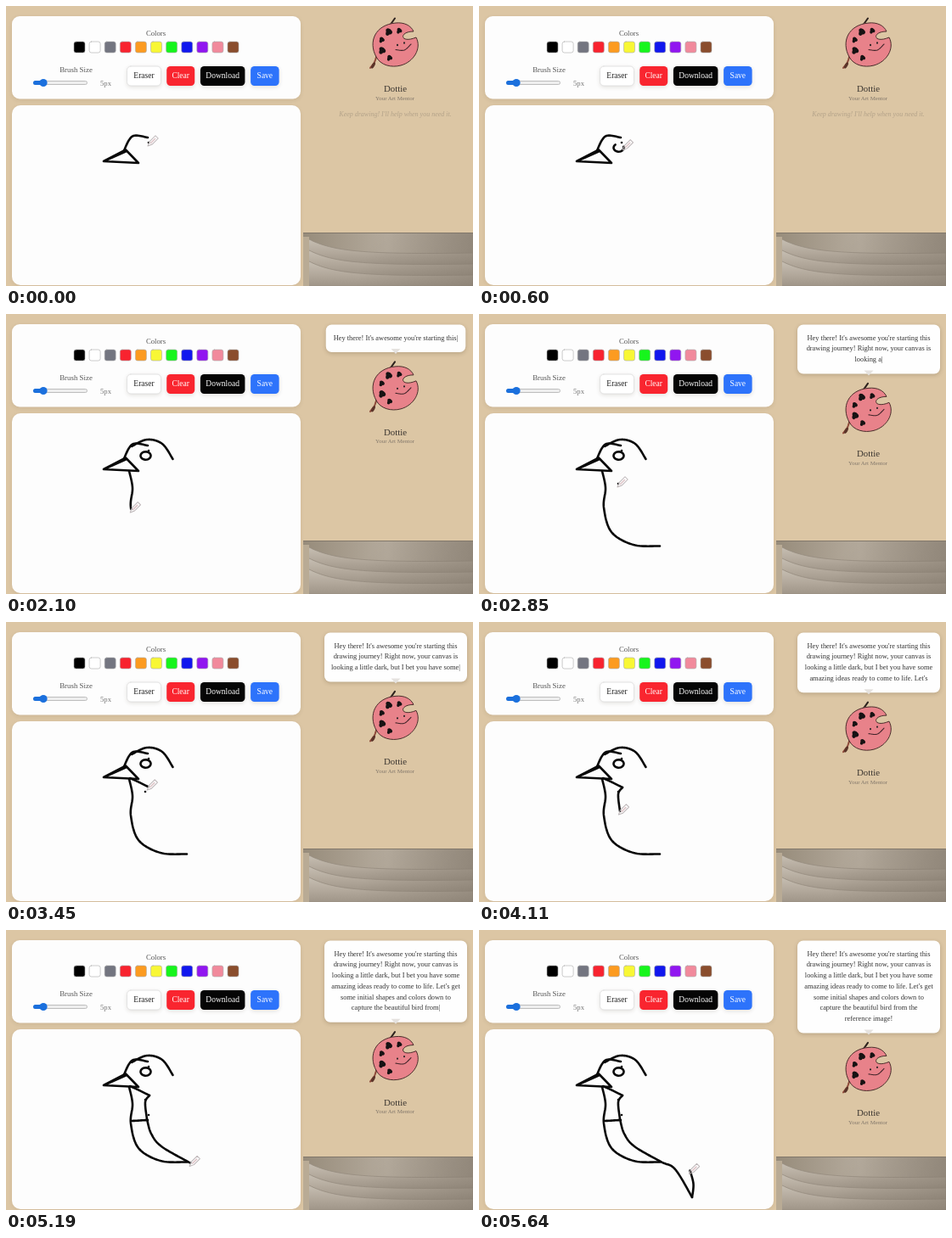
An HTML page with a canvas for the animation above (5670 ms loop, 550 px wide and 330 px high).

```html
<!DOCTYPE html>
<html lang="en">
<head>
<meta charset="utf-8">
<title>Drawing board</title>
<style>
html, body { margin: 0; width: 100%; height: 100%; overflow: hidden; background: #dcc6a4; }
#stage { position: absolute; left: 0; top: 0; width: 550px; height: 330px; overflow: hidden;
  font-family: "Liberation Serif", "Times New Roman", serif; }
canvas { position: absolute; left: 0; top: 0; width: 550px; height: 330px; }
.label { position: absolute; transform: translate(-50%, -50%); white-space: pre; line-height: 1; }
#speech { position: absolute; left: 359px; width: 200px; top: 22.6px; text-align: center;
  white-space: pre; font-size: 8.4px; line-height: 12.75px; color: #333; }
</style>
</head>
<body>
<div id="stage">
  <canvas id="board"></canvas>
  <div id="speech"></div>
</div>
<script>
const LOOP = 5670, STEP = 30;
const LINE_H = 12.75, BUBBLE_TOP = 12.5;
const SPEECH_START = 1500, WORD_MS = 81;
const SAND = '#dcc6a4', PAPER = '#fdfdfd', INK = '#090909';

const stage = document.getElementById('stage');
const board = document.getElementById('board');
const speech = document.getElementById('speech');
const ctx = board.getContext('2d');
const dpr = window.devicePixelRatio || 1;
board.width = 550 * dpr;
board.height = 330 * dpr;

const clamp = v => Math.max(0, Math.min(1, v));
const mix = (a, b, u) => a + (b - a) * u;
const last = a => a[a.length - 1];

function label(text, x, y, size, color, style = '') {
  const el = document.createElement('div');
  el.className = 'label';
  el.textContent = text;
  el.style.cssText = `left:${x}px;top:${y}px;font-size:${size}px;color:${color};${style}`;
  stage.append(el);
  return el;
}

const SWATCHES = ['#000', '#fff', '#737580', '#f8232f', '#fc9b20', '#f8f735',
  '#16f51c', '#1117ee', '#9116f0', '#f18a9c', '#8a4d2d'];

// Buttons sit in a row, each after the last
const buttons = [];
function button(text, w, fill, color = '#fff') {
  const prev = last(buttons);
  const x = prev ? prev.x + prev.w + 6.7 : 142.5;
  buttons.push({ x, w, fill });
  label(text, x + w / 2, 82.5, 9.5, color);
}
button('Eraser', 40, '#fff', '#222');
button('Clear', 33, '#f9252f');
button('Download', 52.5, '#050505');
button('Save', 33.5, '#2d73fb');

label('Colors', 176.5, 32, 8.7, '#555');
label('Brush Size', 82.5, 75, 8.9, '#555');
label('5px', 117.5, 91, 8.6, '#777');
const movers = [
  label('Dottie', 458.5, 97, 10.8, '#3a3530'),
  label('Your Art Mentor', 458, 108.5, 6.9, '#81766a')
];
const hint = label("Keep drawing! I'll help when you need it.", 458.5, 128, 8, '#b3a289', 'font-style:italic');

const LINES = [
  "Hey there! It's awesome you're starting this",
  'drawing journey! Right now, your canvas is',
  'looking a little dark, but I bet you have some',
  "amazing ideas ready to come to life. Let's get",
  'some initial shapes and colors down to',
  'capture the beautiful bird from the',
  'reference image!'
].map(l => l.split(' '));

// Words appear at a steady pace, followed by a blinking caret
function spoken(t) {
  let left = Math.floor((t - SPEECH_START) / WORD_MS);
  const out = [];
  for (const words of LINES) {
    if (left <= 0) break;
    out.push(words.slice(0, left).join(' '));
    left -= words.length;
  }
  const blink = t % 600;
  if (out.length && left <= 0 && blink > 180 && blink < 480) out[out.length - 1] += '|';
  return out;
}

// Catmull-Rom curve through a few points
function curve(...flat) {
  const n = 14, count = flat.length / 2;
  const at = (i, d) => flat[2 * Math.max(0, Math.min(count - 1, i)) + d];
  const out = [[at(0, 0), at(0, 1)]];
  for (let i = 0; i < count - 1; i++)
    for (let k = 1; k <= n; k++) {
      const u = k / n;
      out.push([0, 1].map(d => {
        const a = at(i - 1, d), b = at(i, d), c = at(i + 1, d), e = at(i + 2, d);
        return b + u * (c - a + u * (2 * a - 5 * b + 4 * c - e + u * (3 * b - a - 3 * c + e))) / 2;
      }));
    }
  return out;
}

const lines = (...pts) => pts;

function ring(x, y, rx, ry, from) {
  return Array.from({ length: 30 }, (_, i) => {
    const a = from - i * Math.PI * 2 / 28;
    return [x + rx * Math.cos(a), y + ry * Math.sin(a)];
  });
}

// In drawing order; a single point is a place where the pencil hovers
const STROKES = [
  [0, 0, lines([142, 171], [115, 183], [141, 169.5], [156, 185], [115, 183])],
  [0, 0, curve(139, 170, 149, 153.5, 167, 155)],
  [0, 0, lines([168, 161])],
  [210, 820, ring(164.5, 167, 6, 4.7, 4)],
  [1040, 1530, curve(148, 156, 166, 148, 184, 153, 196.5, 171)],
  [1770, 2580, curve(145, 185, 149, 205, 147, 228, 156, 257, 182, 272, 213, 273.5)],
  [2850, 2850, lines([164, 200])],
  [3180, 3480, curve(146, 184, 157, 189, 169, 195)],
  [3480, 4080, curve(169, 195, 164, 203, 166, 223)],
  [4350, 4710, curve(148, 225, 167, 224)],
  [4770, 4770, lines([168, 218])],
  [4830, 5400, curve(166, 223, 171, 240, 183, 255, 214, 273, 231, 282, 251, 315)],
  [5400, 5660, curve(251, 315, 252.5, 299, 248, 282)]
].map(([from, to, pts]) => ({ from, to, pts }));

const reached = (s, t) => Math.round(clamp((t - s.from) / (s.to - s.from || 1)) * (s.pts.length - 1));

function pencilAt(t) {
  const i = STROKES.findLastIndex(s => s.from <= t);
  const s = STROKES[i], next = STROKES[i + 1];
  if (t < s.to) return s.pts[reached(s, t)];
  const a = last(s.pts);
  if (!next) return a;
  const u = (t - s.to) / (next.from - s.to || 1), e = u * u * (3 - 2 * u);
  return a.map((v, d) => mix(v, next.pts[0][d], e));
}

function path(pts, color, width) {
  ctx.beginPath();
  pts.forEach(([x, y]) => ctx.lineTo(x, y));
  ctx.strokeStyle = color;
  ctx.lineWidth = width;
  ctx.stroke();
}

function box(x, y, w, h, r, fill, shadow = 0, edge) {
  ctx.save();
  if (shadow) {
    ctx.shadowColor = `rgba(60,40,20,${shadow})`;
    ctx.shadowBlur = 5 * dpr;
    ctx.shadowOffsetY = 1.5 * dpr;
  }
  ctx.beginPath();
  ctx.roundRect(x, y, w, h, r);
  ctx.fillStyle = fill;
  ctx.fill();
  ctx.restore();
  if (edge) {
    ctx.strokeStyle = edge;
    ctx.lineWidth = 1;
    ctx.stroke();
  }
}

function dot(x, y, rx, ry, color, turn = 0) {
  ctx.beginPath();
  ctx.ellipse(x, y, rx, ry, turn, 0, Math.PI * 2);
  ctx.fillStyle = color;
  ctx.fill();
}

function tools() {
  box(7, 12, 340, 97.5, 9, PAPER, .1);
  SWATCHES.forEach((c, i) => box(80 + i * 18.1, 42, 13, 13, 2.5, c, 0, 'rgba(170,170,170,.6)'));
  box(32.5, 88.5, 63, 4, 2, '#eee', 0, '#bdbdbd');
  box(32, 88, 13, 5, 2.5, '#1b70dd');
  dot(44, 90.5, 4.6, 4.6, '#1b70dd');
  for (const { x, w, fill } of buttons) box(x, 71, w, 23, 4.5, fill, .14, fill === '#fff' ? '#e2e2e2' : null);
  box(7, 117, 340, 212, 10, PAPER, .08);
}

function fade(x0, y0, x1, y1, ...colors) {
  const g = ctx.createLinearGradient(x0, y0, x1, y1);
  colors.forEach((c, i) => g.addColorStop(i / (colors.length - 1), c));
  return g;
}

// Soft view of a pale curved ceiling
function camera() {
  ctx.save();
  ctx.beginPath();
  ctx.rect(350, 267, 200, 63);
  ctx.clip();
  ctx.fillStyle = fade(350, 0, 550, 0, '#978c7b', '#b5ab9d', '#a1978a');
  ctx.fillRect(350, 267, 200, 63);
  for (let i = 0; i < 3; i++) {
    const y = 275 + i * 13, end = 291 + i * 13;
    ctx.beginPath();
    ctx.moveTo(357, y);
    ctx.bezierCurveTo(385, y + 14, 420, end + 2, 550, end);
    ctx.lineTo(550, 330);
    ctx.lineTo(357, 330);
    ctx.fillStyle = fade(0, y, 0, y + 30, '#c6beb2', '#b3a99c', '#9e9487');
    ctx.fill();
    ctx.strokeStyle = '#968c7f';
    ctx.lineWidth = .8;
    ctx.stroke();
  }
  ctx.fillStyle = fade(430, 280, 550, 330, 'rgba(125,115,102,0)', 'rgba(125,115,102,.5)');
  ctx.fillRect(350, 267, 200, 63);
  ctx.fillStyle = '#b9ab95';
  ctx.fillRect(350, 272, 7, 58);
  ctx.fillStyle = '#81776a';
  ctx.fillRect(350, 266.5, 200, 1.5);
  ctx.restore();
}

function mascot(dy) {
  ctx.save();
  ctx.translate(0, dy);
  path([[452, 23], [458, 14.5]], '#2c211d', 2);
  path(curve(437, 57, 434, 66, 429, 73), '#8d4939', 2);
  ctx.beginPath();
  ctx.moveTo(436, 60);
  ctx.bezierCurveTo(426, 42, 435, 22, 459, 20);
  ctx.bezierCurveTo(469, 19, 477, 23, 480, 30);
  ctx.bezierCurveTo(462, 30, 464, 45, 483, 37);
  ctx.bezierCurveTo(490, 50, 480, 66, 465, 70);
  ctx.bezierCurveTo(454, 73, 441, 70, 436, 60);
  ctx.fillStyle = '#e8828a';
  ctx.fill();
  ctx.strokeStyle = '#4a2d2b';
  ctx.lineWidth = 1;
  ctx.stroke();
  for (let i = 0; i < 5; i++) {
    const a = -1.3 - i * .75, r = 3.2 + i % 2;
    const x = 459 + 17 * Math.cos(a), y = 45 + 17 * Math.sin(a);
    dot(x, y, r, r * .65, '#171213', .7);
    dot(x - 1, y + 1, r * .6, r, '#171213', .4);
  }
  dot(432.5, 70, 1.7, 4, '#5b3429', .5);
  dot(461, 46, 1, 1.2, '#222');
  dot(469, 43.5, 1, 1.2, '#222');
  path(curve(459, 51.5, 469, 52, 477, 45), '#42252a', 1.1);
  ctx.restore();
}

function pencil([x, y]) {
  ctx.save();
  ctx.translate(x - 1, y + 4);
  ctx.rotate(-Math.PI / 4);
  path([[0, 0], [5, -2.3], [15, -2.3], [15, 2.3], [5, 2.3], [0, 0]], '#bcb5b7', 1);
  path([[5, 0], [12, 0]], '#dfc6c9', 1.6);
  ctx.restore();
}

function textWidth(s) {
  ctx.font = '8.4px "Liberation Serif", "Times New Roman", serif';
  return ctx.measureText(s).width;
}

// Returns how far the figure below is pushed down
function bubble(rows) {
  speech.textContent = rows.join('\n');
  if (!rows.length) return 0;
  const h = 19.8 + LINE_H * rows.length, end = BUBBLE_TOP + h;
  const w = rows.length > 1 ? 168 : Math.min(168, textWidth(rows[0]) + 18);
  box(459 - w / 2, BUBBLE_TOP, w, h, 7, '#fefefe', .22);
  ctx.beginPath();
  ctx.moveTo(453.5, end - 4);
  ctx.lineTo(464.5, end - 4);
  ctx.lineTo(459, end + 2);
  ctx.fillStyle = '#e5e2df';
  ctx.fill();
  return h + 9.3;
}

function draw(t) {
  ctx.setTransform(dpr, 0, 0, dpr, 0, 0);
  ctx.fillStyle = SAND;
  ctx.fillRect(0, 0, 550, 330);
  ctx.lineCap = ctx.lineJoin = 'round';
  tools();
  camera();
  for (const s of STROKES) {
    if (t < s.from) break;
    path(s.to ? s.pts.slice(0, reached(s, t) + 1) : s.pts, INK, 2.6);
  }
  pencil(pencilAt(t));
  const shift = bubble(spoken(t));
  mascot(shift);
  for (const el of movers) el.style.marginTop = shift + 'px';
  hint.style.display = shift ? 'none' : '';
}

const start = performance.now();
function tick() {
  const t = (performance.now() - start) % LOOP;
  draw(Math.floor(t / STEP) * STEP);
  requestAnimationFrame(tick);
}
tick();
</script>
</body>
</html>
```
